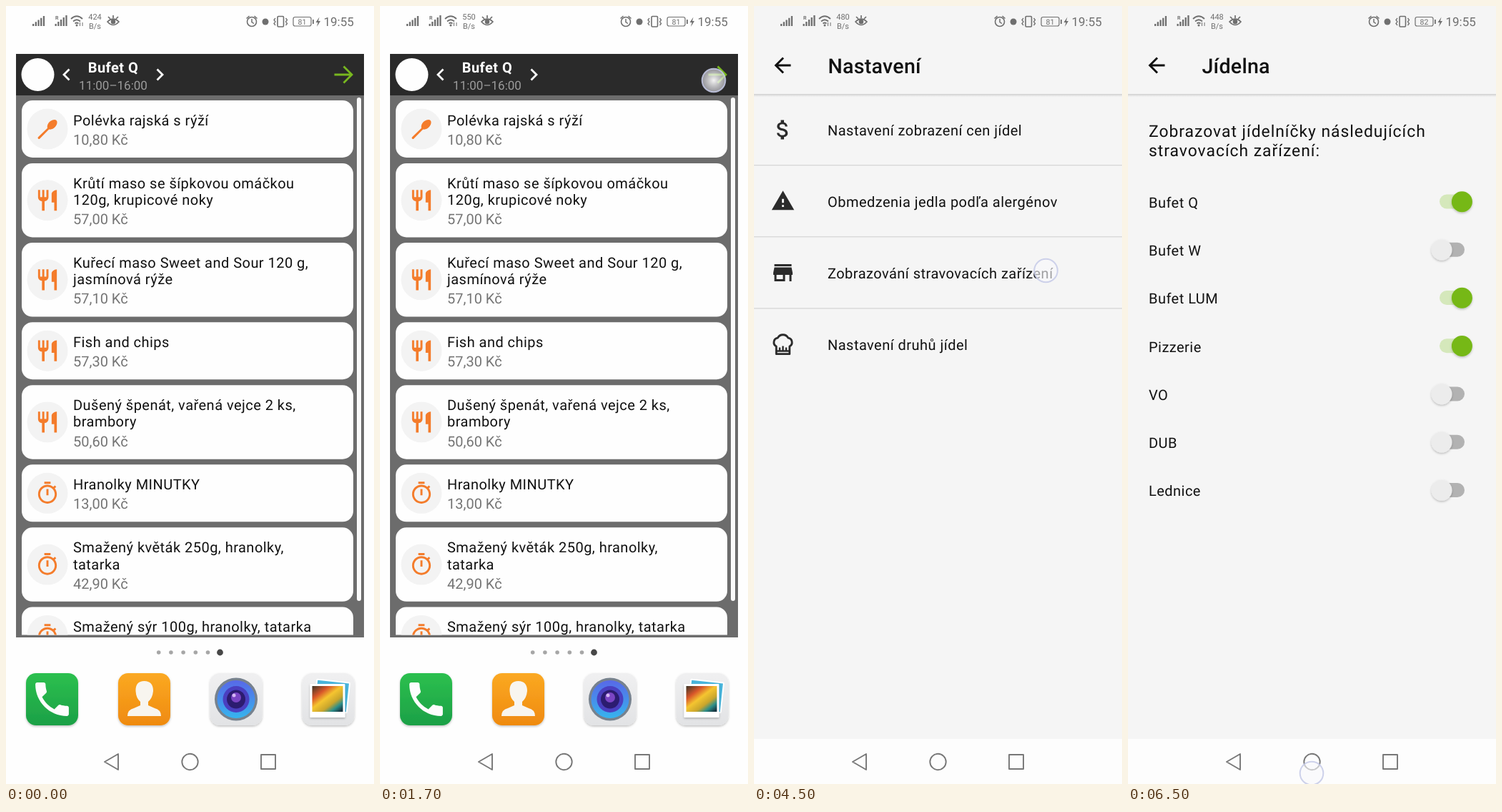
Write an HTML page that moves like this. It is 515 px wide and 1088 px high and loops after 8000 ms.

```html
<!DOCTYPE html>
<html lang="cs">
<head>
<meta charset="utf-8">
<title>Jídelníček</title>
<style>
  html, body { margin: 0; width: 100%; height: 100%; overflow: hidden; background: #fefefe; }
  svg { display: block; width: 515px; height: 1088px; }
  text { font-family: Roboto, "Noto Sans", sans-serif; white-space: pre; text-rendering: geometricPrecision; }
</style>
</head>
<body>
<svg id="stage" viewBox="0 0 515 1088" xmlns="http://www.w3.org/2000/svg"></svg>
<script>
const ORANGE = '#f47c2b', GREEN = '#76b818', GRAY = '#757575', INK = '#111';

const PATHS = {
  fork: 'M11 9H9V2H7V9H5V2H3V9C3 11.12 4.66 12.84 6.75 12.97V22H9.25V12.97C11.34 12.84 13 11.12 13 9V2H11V9M16 6V14H18.5V22H21V2C18.24 2 16 4.24 16 6Z',
  timer: 'M15 1H9v2h6V1zm-4 13h2V8h-2v6zm8.03-6.61l1.42-1.42c-.43-.51-.9-.99-1.41-1.41l-1.42 1.42C16.07 4.74 14.12 4 12 4c-4.97 0-9 4.03-9 9s4.02 9 9 9 9-4.03 9-9c0-2.12-.74-4.07-1.97-5.61zM12 20c-3.87 0-7-3.13-7-7s3.13-7 7-7 7 3.13 7 7-3.13 7-7 7z',
  spoon: 'M3.1 19.700 12 11.200C11.4 8.800 12.6 6.200 14.800 4.500C17 2.900 19.500 2.600 20.600 3.700C21.700 4.800 21.500 7.200 20 9.300C18.300 11.600 15.900 12.800 13.500 12.400L4.700 21.300Q3.9 22 3.100 21.300Q2.300 20.500 3.100 19.700Z',
  dollar: 'M11.8 10.9c-2.27-.59-3-1.2-3-2.15 0-1.09 1.01-1.85 2.7-1.85 1.78 0 2.44.85 2.5 2.1h2.21c-.07-1.72-1.12-3.3-3.21-3.81V3h-3v2.16c-1.94.42-3.5 1.68-3.5 3.61 0 2.31 1.91 3.46 4.7 4.13 2.5.6 3 1.48 3 2.41 0 .69-.49 1.79-2.7 1.79-2.06 0-2.87-.92-2.98-2.1h-2.2c.12 2.19 1.76 3.42 3.68 3.83V21h3v-2.15c1.95-.37 3.5-1.5 3.5-3.55 0-2.84-2.43-3.81-4.7-4.4z',
  warning: 'M1 21h22L12 2 1 21zm12-3h-2v-2h2v2zm0-4h-2v-4h2v4z',
  store: 'M20 4H4v2h16V4zm1 10v-2l-1-5H4l-1 5v2h1v6h10v-6h4v6h2v-6h1zm-9 4H6v-4h6v4z',
  phone: 'M6.62 10.79c1.44 2.83 3.76 5.14 6.59 6.59l2.2-2.2c.27-.27.67-.36 1.02-.24 1.12.37 2.33.57 3.57.57.55 0 1 .45 1 1V20c0 .55-.45 1-1 1-9.39 0-17-7.61-17-17 0-.55.45-1 1-1h3.5c.55 0 1 .45 1 1 0 1.25.2 2.45.57 3.57.11.35.03.74-.25 1.02l-2.2 2.2z'
};

const MEALS = [
  { icon: 'spoon', price: '10,80', lines: ['Polévka rajská s rýží'] },
  { icon: 'fork', price: '57,00', lines: ['Krůtí maso se šípkovou omáčkou', '120g, krupicové noky'],
    narrow: ['Krůtí maso se šípkovou', 'omáčkou 120g, krupicové …'] },
  { icon: 'fork', price: '57,10', lines: ['Kuřecí maso Sweet and Sour 120 g,', 'jasmínová rýže'],
    narrow: ['Kuřecí maso Sweet and Sour', '120 g, jasmínová rýže'] },
  { icon: 'fork', price: '57,30', lines: ['Fish and chips'] },
  { icon: 'fork', price: '50,60', lines: ['Dušený špenát, vařená vejce 2 ks,', 'brambory'],
    narrow: ['Dušený špenát, vařená vejce', '2 ks, brambory'] },
  { icon: 'timer', price: '13,00', lines: ['Hranolky MINUTKY'] },
  { icon: 'timer', price: '42,90', lines: ['Smažený květák 250g, hranolky,', 'tatarka'],
    narrow: ['Smažený květák 250g,', 'hranolky, tatarka'] },
  { icon: 'timer', price: '45,20', lines: ['Smažený sýr 100g, hranolky, tatarka'] }
];

const text = (x, y, s, { size = 20, fill = INK, gap = .47, weight = 400, anchor = 'start', id = '' } = {}) =>
  `<text x="${x}" y="${y}" font-size="${size}" fill="${fill}" letter-spacing="${gap}" font-weight="${weight}" text-anchor="${anchor}" ${id && `id="${id}"`}>${s}</text>`;
const rect = (x, y, w, h, fill, r = 0, extra = '') =>
  `<rect x="${x}" y="${y}" width="${w}" height="${h}" rx="${r}" fill="${fill}" ${extra}/>`;
const circle = (x, y, r, fill, extra = '') => `<circle cx="${x}" cy="${y}" r="${r}" fill="${fill}" ${extra}/>`;
const line = (d, stroke, width, extra = '') =>
  `<path d="${d}" fill="none" stroke="${stroke}" stroke-width="${width}" ${extra}/>`;
const icon = (name, x, y, fill, scale = 1.43) =>
  `<path d="${PATHS[name]}" fill="${fill}" transform="translate(${x} ${y}) scale(${scale}) translate(-12 -12)"/>`;
const group = (id, body) => `<g id="${id}">${body}</g>`;
const repeat = (n, fn) => Array.from({ length: n }, (_, i) => fn(i)).join('');

const defs = `<defs>
  <clipPath id="widgetClip"><rect x="14" y="125" width="487" height="754.5"/></clipPath>
  <clipPath id="listClip"><rect y="194" width="515" height="831"/></clipPath>
  <linearGradient id="shade" x2="0" y2="1"><stop stop-color="#000" stop-opacity=".16"/><stop offset="1" stop-color="#000" stop-opacity="0"/></linearGradient>
  <linearGradient id="call" x2="0" y2="1"><stop stop-color="#2cc04f"/><stop offset="1" stop-color="#1ca046"/></linearGradient>
  <linearGradient id="person" x2="0" y2="1"><stop stop-color="#fba922"/><stop offset="1" stop-color="#ef8a10"/></linearGradient>
  <linearGradient id="tile" x2="0" y2="1"><stop stop-color="#f0f0f1"/><stop offset="1" stop-color="#e2e3e5"/></linearGradient>
  <linearGradient id="lens" x2="0" y2="1"><stop stop-color="#5868e8"/><stop offset="1" stop-color="#36b4ee"/></linearGradient>
  <linearGradient id="photo" x1="0" y1="0" x2=".9" y2="1"><stop stop-color="#3a3528"/><stop offset=".28" stop-color="#d8562a"/><stop offset=".48" stop-color="#f5c530"/><stop offset=".7" stop-color="#c9a52c"/><stop offset=".85" stop-color="#2d8f8a"/><stop offset="1" stop-color="#173440"/></linearGradient>
  <radialGradient id="press"><stop stop-color="#fff" stop-opacity=".95"/><stop offset=".5" stop-color="#f2f2f5" stop-opacity=".75"/><stop offset="1" stop-color="#d5d5de" stop-opacity=".62"/></radialGradient>
  <filter id="soft" x="-30%" y="-30%" width="160%" height="170%"><feDropShadow dx="0" dy="1.5" stdDeviation="1.5" flood-opacity=".25"/></filter>
</defs>`;

function bars(x, count, height, color) {
  return repeat(count, i => {
    const h = 3 + (height - 3) * i / (count - 1);
    return rect(x + i * 3.7, 28 - h, 2.3, h, color);
  });
}

function statusBar() {
  const c = '#6f6f6f', small = { size: 10.5, fill: c, gap: 0, anchor: 'middle' };
  return bars(37, 5, 14, c) + bars(68.5, 5, 15, c) + text(69, 19, 'R', { ...small, size: 7, anchor: 'start', weight: 700 }) +
    line('M91 18Q99 10.5 107 18M94 21.5Q99 17 104 21.5M96.5 24.5Q99 22.5 101.5 24.5', c, 1.8) + circle(99, 27, 1.5, c) +
    line('M103.5 23v5M107 23v5', c, 1) +
    text(124.5, 19, '', { ...small, size: 11, id: 'speed' }) + text(124.5, 31.5, 'B/s', { ...small, size: 11 }) +
    line('M142 22Q150 14.5 158 22Q150 31 142 22ZM143 15l3 3M150 13v4M157 15l-3 3', c, 1.7) + circle(150, 22, 3.3, c) +
    circle(344, 22, 6.5, 'none', `stroke="${c}" stroke-width="1.6"`) +
    line('M344 18v4.5l3 2M336.5 17.5l4-3.5M351.5 17.5l-4-3.5', c, 1.5) +
    circle(363, 22, 4.5, c) +
    rect(380, 14.5, 8.5, 14.5, 'none', 1.2, `stroke="${c}" stroke-width="1.6"`) +
    line('M377 17l-2 2.5 2 2.5-2 2.5 2 2.5M391.5 17l2 2.5-2 2.5 2 2.5-2 2.5', c, 1.3) +
    rect(402, 15.5, 25, 12.5, 'none', 2.5, `stroke="${c}" stroke-width="1.2"`) + rect(429, 19, 1.8, 6, c) +
    text(414.5, 25.7, '', { ...small, id: 'battery' }) +
    `<path d="M438.5 15.5L433.5 23h3L435 29l5-8h-3z" fill="${c}"/>` +
    text(444.5, 28, '19:55', { size: 17, fill: c, gap: 0 });
}

const navBar = () =>
  line('M138 1057L157 1046V1068ZM357 1047H377V1067H357Z', '#777', 1.9, 'stroke-linejoin="round"') +
  circle(257.5, 1057, 11.2, 'none', 'stroke="#777" stroke-width="1.9"');

function homeCards() {
  let y = 132;
  return MEALS.map(meal => {
    const extra = (meal.lines.length - 1) * 23.5, h = 80 + extra;
    const body = rect(22, y, 464, h, '#fefefe', 15) + circle(58, y + h / 2, 28.5, '#f3f3f3') +
      icon(meal.icon, 58, y + h / 2, ORANGE, 1.46) +
      meal.lines.map((s, i) => text(94, y + 34.7 + i * 23.5, s)).join('') +
      text(94, y + 61.8 + extra, meal.price + ' Kč', { fill: GRAY, gap: 0 });
    y += h + (extra ? 7.6 : 8);
    return body;
  }).join('');
}

function dock() {
  const tile = (x, fill) => rect(x, 933, 73, 73, fill, 14, 'filter="url(#soft)"');
  return repeat(5, i => circle(213.7 + i * 17.2, 904, 2.8, '#a6a6a6')) + circle(299.5, 904, 4.4, '#474747') +
    tile(28, 'url(#call)') + icon('phone', 64.5, 969.5, '#fdfdfd', 2.6) +
    tile(157, 'url(#person)') +
    '<path d="M170 993Q170 984 179 982L188 978V973Q182 968 181.5 958Q181 944 193.5 944T206 958Q205 968 199 973V978L208 982Q217 984 217 993Z" fill="#f8f5ef"/>' +
    tile(285.5, 'url(#tile)') + circle(322, 969.5, 30, '#77828e') + circle(322, 969.5, 26.5, 'url(#lens)') +
    circle(322, 969.5, 18.5, '#4a3fc0') + circle(322, 969.5, 13, '#2c1c70') + circle(322, 967, 7, '#7b45c4') + circle(319, 964, 2.5, '#d6b8f5') +
    tile(414.5, 'url(#tile)') + rect(433, 944, 46, 42, '#48b5dc', 1, 'transform="rotate(6 456 965)" stroke="#fff" stroke-width="2"') +
    rect(425.5, 948, 49, 47, '#fff', 1, 'filter="url(#soft)"') + rect(428.5, 951, 43, 36, 'url(#photo)');
}

const home = () => rect(0, 0, 515, 1088, '#fefefe') +
  rect(14, 67, 487, 816, '#6c6c6c') + rect(14, 67, 487, 58, '#2a2a2a') +
  circle(44.5, 96, 23, '#fefefe') +
  line('M88.5 88.5L81 96l7.5 7.5M211.5 88.5L219 96l-7.5 7.5', '#fff', 2.8) +
  text(150, 92.5, 'Bufet Q', { fill: '#fff', weight: 700, anchor: 'middle' }) +
  text(150, 116.5, '11:00–16:00', { size: 17, fill: '#9c9c9c', gap: 0, anchor: 'middle' }) +
  line('M459.5 96H484M472.5 84.5L484 96l-11.5 11.5', '#78b81f', 2.8) +
  `<g clip-path="url(#widgetClip)">${homeCards()}</g>` +
  rect(491, 128, 6, 704, '#fafafa', 3) + dock();

const page = (title, barBottom) => rect(0, 0, 515, 1088, '#f5f5f5') + rect(0, 1025, 515, 63, '#fdfdfd') +
  rect(0, barBottom, 515, 4, 'url(#shade)') +
  line('M51.5 83H30.5M41 72.5L30.5 83L41 93.5', '#111', 2.9) +
  text(103.5, 94, title, { size: 28.6, weight: 500, gap: .25 });

function gear(x, y) {
  return `<g transform="translate(${x} ${y})">` + circle(0, 0, 7.6, 'none', 'stroke="#7ab530" stroke-width="5.6"') +
    repeat(6, i => rect(-3.3, -14, 6.6, 6, '#7ab530', 1, `transform="rotate(${i * 60})"`)) + '</g>';
}

function menuCards() {
  return MEALS.slice(0, 7).map((meal, i) => {
    const y = 293.7 + i * 110.25, lines = meal.narrow || meal.lines, two = lines.length > 1;
    return rect(23, y, 469, 102.5, '#fdfdfd', 15) + circle(70, y + 51.3, 33, '#f5f5f5') +
      icon(meal.icon, 70, y + 51.3, ORANGE) +
      lines.map((s, k) => text(133.3, y + (two ? 32 : 39.5) + k * 23.5, s)).join('') +
      text(133.3, y + (two ? 86.7 : 79.3), meal.price + ' Kč', { fill: GRAY, gap: 0 });
  }).join('');
}

function menu() {
  const tab = (x, s, fill) => text(x, 165, s, { fill, weight: 500, gap: 1.9, anchor: 'middle' });
  return page('Menu', 191) + gear(481.5, 83) +
    tab(87, 'BUFET Q', GREEN) + tab(259, 'BUFET LUM', '#6b6b74') + tab(430.5, 'PIZZERIE', '#6b6b74') +
    rect(0, 188.5, 172, 3.2, GREEN) +
    text(23, 270.5, 'Pondelok 30. 11. 2020', { weight: 700 }) +
    text(367, 270.5, '11:00–16:00', { fill: '#a3a3a3', gap: .5 }) +
    `<g clip-path="url(#listClip)">${menuCards()}</g>`;
}

const chefHat = (x, y) => `<g transform="translate(${x} ${y})">` +
  line('M-9.3 13.2V2.5A6.3 6.3 0 0 1 -7.3 -9.3A8.2 8.2 0 0 1 7.3 -9.3A6.3 6.3 0 0 1 9.3 2.5V13.2Z', '#2b2b2b', 2.8, 'stroke-linejoin="round"') +
  line('M-9 9H9M-4.5 9V4M0 9V2M4.5 9V4', '#2b2b2b', 2.4) + '</g>';

function settings() {
  const rows = ['Nastavení zobrazení cen jídel', 'Obmedzenia jedla podľa alergénov',
    'Zobrazování stravovacích zařízení', 'Nastavení druhů jídel'];
  return page('Nastavení', 123) +
    rows.map((s, i) => text(103, 180.5 + i * 100.2, s)).join('') +
    repeat(3, i => rect(0, 222 + i * 100.1, 515, 1.3, '#d6d6d6')) +
    icon('dollar', 40.5, 173, '#2b2b2b', 1.5) + icon('warning', 40.5, 272.5, '#2b2b2b') +
    icon('store', 40.5, 373, '#2b2b2b', 1.5) + chefHat(40.5, 473.5);
}

function canteens() {
  const rows = [['Bufet Q', 1], ['Bufet W', 0], ['Bufet LUM', 1], ['Pizzerie', 1], ['VO', 0], ['DUB', 0], ['Lednice', 0]];
  const heading = { size: 22.9, gap: .98 };
  return page('Jídelna', 123) +
    text(29, 183, 'Zobrazovat jídelníčky následujících', heading) + text(29, 210, 'stravovacích zařízení:', heading) +
    rows.map(([name, on], i) => {
      const y = 273.8 + i * 67.25;
      return text(29, y + 8, name) + rect(on ? 436 : 426, y - 10.3, 45, 20, on ? '#d5e8bb' : '#b2b2b2', 10) +
        circle(on ? 467.4 : 439, y, 14.5, on ? GREEN : '#ececec', 'filter="url(#soft)"');
    }).join('');
}

const touch = circle(0, 0, 16.3, 'url(#press)', 'id="touchDot" stroke="#c6cbe8" stroke-opacity=".85" stroke-width="2"');

const stage = document.getElementById('stage');
stage.innerHTML = defs + group('home', home()) + group('menu', menu()) + group('settings', settings()) +
  group('canteens', canteens()) + statusBar() + navBar() + group('touch', touch);

const LOOP = 8000;
const STEPS = [
  { at: 0, screen: 'home', speed: 424, battery: 81 },
  { at: 500, screen: 'home', speed: 550, battery: 81, touch: [467, 104] },
  { at: 2500, screen: 'menu', speed: 424, battery: 81, touch: [486, 87.5] },
  { at: 4500, screen: 'settings', speed: 480, battery: 81, touch: [408.5, 370] },
  { at: 6500, screen: 'canteens', speed: 448, battery: 82, touch: [257, 1073] }
];
const byId = id => document.getElementById(id);
let current;

function show(step) {
  for (const id of ['home', 'menu', 'settings', 'canteens'])
    byId(id).style.display = id === step.screen ? '' : 'none';
  byId('speed').textContent = step.speed;
  byId('battery').textContent = step.battery;
  byId('touch').style.display = step.touch ? '' : 'none';
  if (step.touch) byId('touch').setAttribute('transform', `translate(${step.touch})`);
  byId('touchDot').setAttribute('fill', step.screen === 'home' ? 'url(#press)' : 'rgba(248,248,252,.62)');
}

const start = performance.now();
function frame() {
  const t = (performance.now() - start) % LOOP;
  const step = STEPS.findLast(s => s.at <= t);
  if (step !== current) show(current = step);
  requestAnimationFrame(frame);
}
frame();
</script>
</body>
</html>
```
